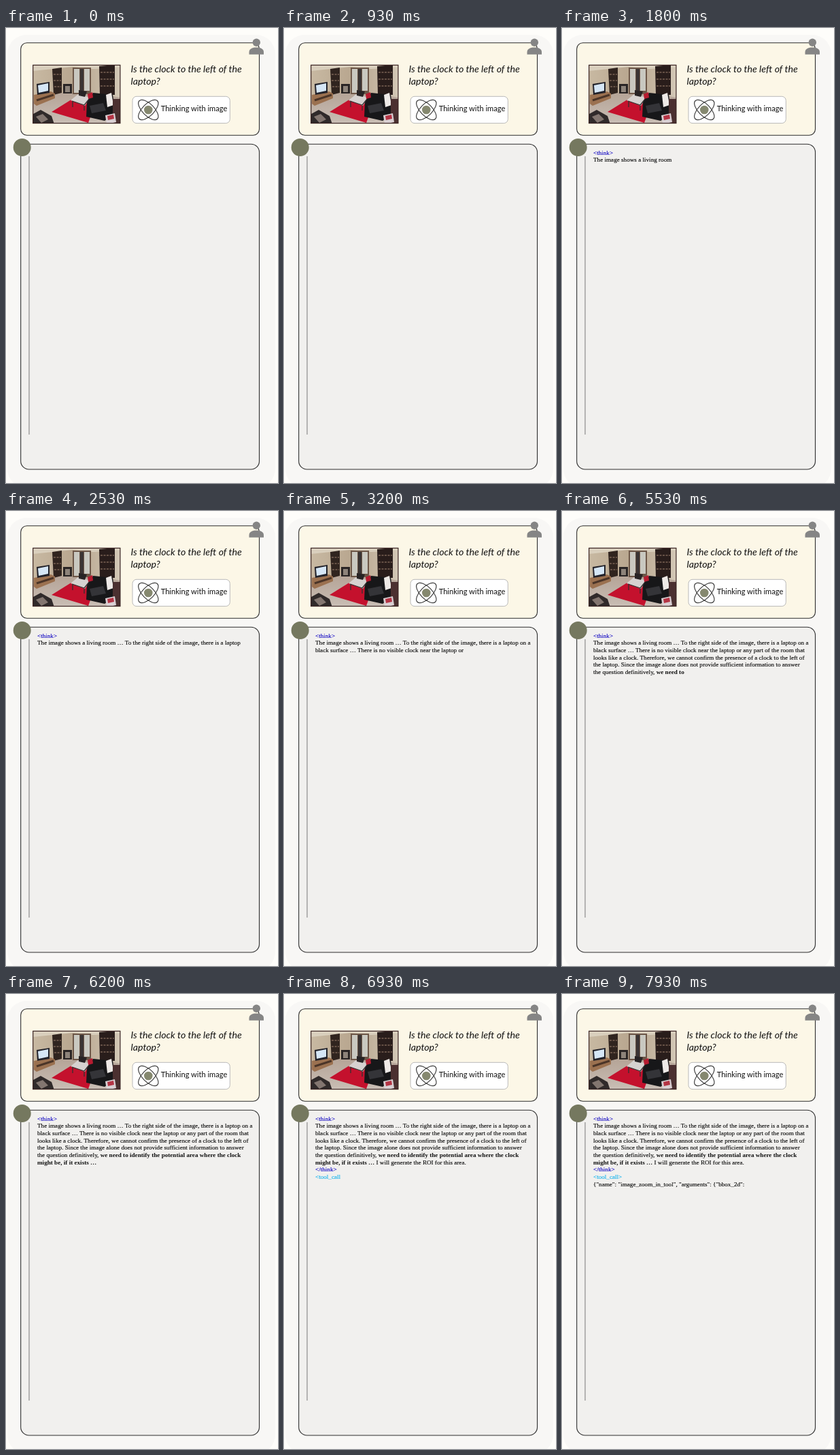
An HTML page for the animation above (8 s loop, 400 px wide and 667 px high).

```html
<!DOCTYPE html>
<html lang="en">
<head>
<meta charset="utf-8">
<title>Thinking with image</title>
<style>
  html, body { margin: 0; width: 100%; height: 100%; overflow: hidden; background: #fefdfa; }
  svg { display: block; width: 100%; height: 100%; }
  text { white-space: pre; }
  .question { font: italic 14.2px Lato, Carlito, sans-serif; }
  .button { font: 11.1px Lato, Carlito, sans-serif; }
  #answer { font: 9.15px "Liberation Serif", "Times New Roman", serif; stroke-width: .15; }
  .plain { fill: #111; stroke: #111; }
  .bold { fill: #111; font-weight: bold; }
  .think { fill: #1a0fc4; stroke: #1a0fc4; }
  .tool { fill: #18b4ee; stroke: #18b4ee; }
</style>
</head>
<body>
<svg viewBox="0 0 400 667" xmlns="http://www.w3.org/2000/svg">
  <defs>
    <clipPath id="photo"><rect x="39.5" y="54" width="128.5" height="86"/></clipPath>
    <linearGradient id="wall" x2="1" y2="0">
      <stop offset="0" stop-color="#c8b9a2"/><stop offset=".5" stop-color="#b7a58e"/><stop offset="1" stop-color="#d3c8b6"/>
    </linearGradient>
    <linearGradient id="carpet" x2="0" y2="1">
      <stop offset="0" stop-color="#b5a497"/><stop offset="1" stop-color="#c9beb5"/>
    </linearGradient>
  </defs>

  <rect width="400" height="667" fill="#fefdfa"/>
  <rect x="2" y="10" width="394" height="664" rx="28" fill="#f8f7f5"/>
  <g stroke="#2e2e2e" stroke-width="1.1">
    <rect x="21.7" y="21.7" width="350.8" height="135.5" rx="9" fill="#fcf7e7"/>
    <rect x="21.7" y="170.2" width="350.8" height="476.8" rx="12" fill="#f1f0ee"/>
  </g>

  <g clip-path="url(#photo)">
    <rect x="39" y="54" width="130" height="87" fill="url(#wall)"/>
    <path d="M39 54H168V58L128 60L98 57L39 63Z" fill="#d9cfbd"/>
    <path d="M39 108L72 95H132L168 102V141H39Z" fill="url(#carpet)"/>
    <!-- door and shelves -->
    <path d="M98 58H125V97H98Z" fill="#6d5748"/>
    <path d="M100 60H108V95H100ZM115 60H123V92H115Z" fill="#c9c8c0"/>
    <path d="M109 60H114V95H109Z" fill="#3a3434"/>
    <path d="M68 60L82 58V95L70 98Z" fill="#30241f"/>
    <path d="M137 56L160 54V98H138Z" fill="#291d1b"/>
    <path d="M70 68H81M70 77H81M71 86H81M139 65H159M139 75H159M139 85H159" stroke="#796153" stroke-width="1.4" stroke-dasharray="3 1.5"/>
    <path d="M84 82H97V96H84Z" fill="#2a2525"/>
    <path d="M87 85H94V94H87Z" fill="#8d837a"/>
    <!-- television -->
    <path d="M41 98L66 93L72 96V103L45 114L41 111Z" fill="#9b7150"/>
    <path d="M45 106L70 98" stroke="#4b3528" stroke-width="3"/>
    <path d="M45 82L64 79V95L46 98Z" fill="#22222a"/>
    <path d="M47 84L62 81V92L48 95Z" fill="#d5e6f6"/>
    <!-- rug, table and seats -->
    <path d="M96 105L132 109L121 139L67 123Z" fill="#c4112d"/>
    <path d="M95 106L106 97L124 102L116 114Z" fill="#d6d2d0"/>
    <path d="M97 107L115 113L123 103M98 108V116M115 114V121" fill="none" stroke="#34302f" stroke-width="1.3"/>
    <path d="M107 91L119 93L116 101L107 99Z" fill="#282425"/>
    <path d="M119 109L128 95L157 98L161 125L145 136L118 130Z" fill="#171719"/>
    <path d="M123 114L143 110L147 121L126 125Z" fill="#343438"/>
    <path d="M147 98L155 95L158 113L149 116Z" fill="#eeeae7"/>
    <path d="M120 97L127 94L128 102L121 104Z" fill="#b61b30"/>
    <path d="M157 104H168V141H157Z" fill="#4b3030"/>
    <path d="M146 128L160 125L162 138L148 141Z" fill="#d8cfd2"/>
    <path d="M149 129L158 127L159 133L150 135Z" fill="#b43444"/>
    <path d="M40 126L51 120L67 129L71 141H39Z" fill="#302a2a"/>
    <path d="M44 130L54 126L62 134L52 139Z" fill="#837670"/>
  </g>
  <rect x="39.7" y="54.4" width="128.2" height="85.2" fill="none" stroke="#3a2424" stroke-width="1.2"/>

  <g class="question" fill="#111">
    <text x="183.5" y="65">Is the clock to the left of the</text>
    <text x="183.5" y="83">laptop?</text>
  </g>

  <rect x="186" y="100.3" width="143.3" height="39.3" rx="6" fill="#fff" stroke="#b9b9b9"/>
  <g transform="translate(209.3 120)" fill="none" stroke="#3c3c3c" stroke-width="1.2">
    <ellipse rx="18.8" ry="8.6" transform="rotate(45)"/>
    <ellipse rx="18.8" ry="8.6" transform="rotate(-45)"/>
    <circle r="6.3" fill="#85886f" stroke="none"/>
  </g>
  <text class="button" x="227.7" y="122.3" fill="#111">Thinking with image</text>

  <g fill="#858585">
    <circle cx="368.3" cy="21.3" r="5.7"/>
    <path d="M357.5 38.8V35.2C357.5 30.5 363 28.6 368.3 28.6S379 30.5 379 35.2V38.8Z"/>
  </g>

  <path d="M34 188V596" stroke="#8c8c8c" stroke-width="1.2"/>
  <circle cx="23.7" cy="175" r="13" fill="#75785f"/>
  <g id="answer"></g>
</svg>

<script>
  const LOOP = 8000, FIRST_STEP = 13, TOKENS_PER_STEP = 2;
  const LEFT = 46, BASELINE = 185.8, LEADING = 10.65;

  // Each line holds runs of [style, tokens]; an empty token is a short pause.
  const lines = [
    [["think", "<|think|>|"]],
    [["plain", "The| image| shows| a| living| room| …| To| the| right| side| of| the| image|,|| there| is| a| laptop| on| a"]],
    [["plain", "black| surface| …| There| is| no| visible| clock| near| the| laptop| or| any| part| of| the| room| that"]],
    [["plain", "looks| like| a| clock|.| Therefore|,| we| cannot| confirm| the| presence| of| a| clock| to| the| left| of"]],
    [["plain", "the| laptop|.| Since| the| image| alone| does| not| provide| sufficient| information| to| answer"]],
    [["plain", "the| question| definitively|,"], ["bold", " we| need| to| identify| the| potential| area| where| the| clock"]],
    [["bold", "might| be|,| if| it| exists| …"], ["plain", " I| will| generate| the| ROI| for| this| area|."]],
    [["think", "</|think|>"]],
    [["tool", "<|tool_call|>"]],
    [["plain", '{"|name|":| "|image|_zoom|_in|_tool|",| "|arguments|":| {"|bb|ox|_|2|d|":']],
  ];

  function add(parent, tag, attributes) {
    const node = document.createElementNS("http://www.w3.org/2000/svg", tag);
    for (const [key, value] of Object.entries(attributes)) node.setAttribute(key, value);
    return parent.appendChild(node);
  }

  const answer = document.getElementById("answer");
  const runs = lines.flatMap((line, row) => {
    const text = add(answer, "text", { x: LEFT, y: BASELINE + row * LEADING });
    return line.map(([style, source]) => ({
      node: add(text, "tspan", { class: style }),
      tokens: source.split("|"),
    }));
  });

  // Steps alternate between 130 ms and 70 ms.
  const stepAt = time => 2 * Math.floor(time / 200) + (time % 200 >= 130 ? 1 : 0);

  let shown = -1;
  function render(time) {
    const step = stepAt(time % LOOP);
    if (step === shown) return;
    shown = step;
    let left = Math.max(0, (step - FIRST_STEP) * TOKENS_PER_STEP);
    for (const { node, tokens } of runs) {
      node.textContent = tokens.slice(0, left).join("");
      left = Math.max(0, left - tokens.length);
    }
  }

  const start = performance.now();
  function tick() {
    render(performance.now() - start);
    requestAnimationFrame(tick);
  }
  tick();
</script>
</body>
</html>
```
